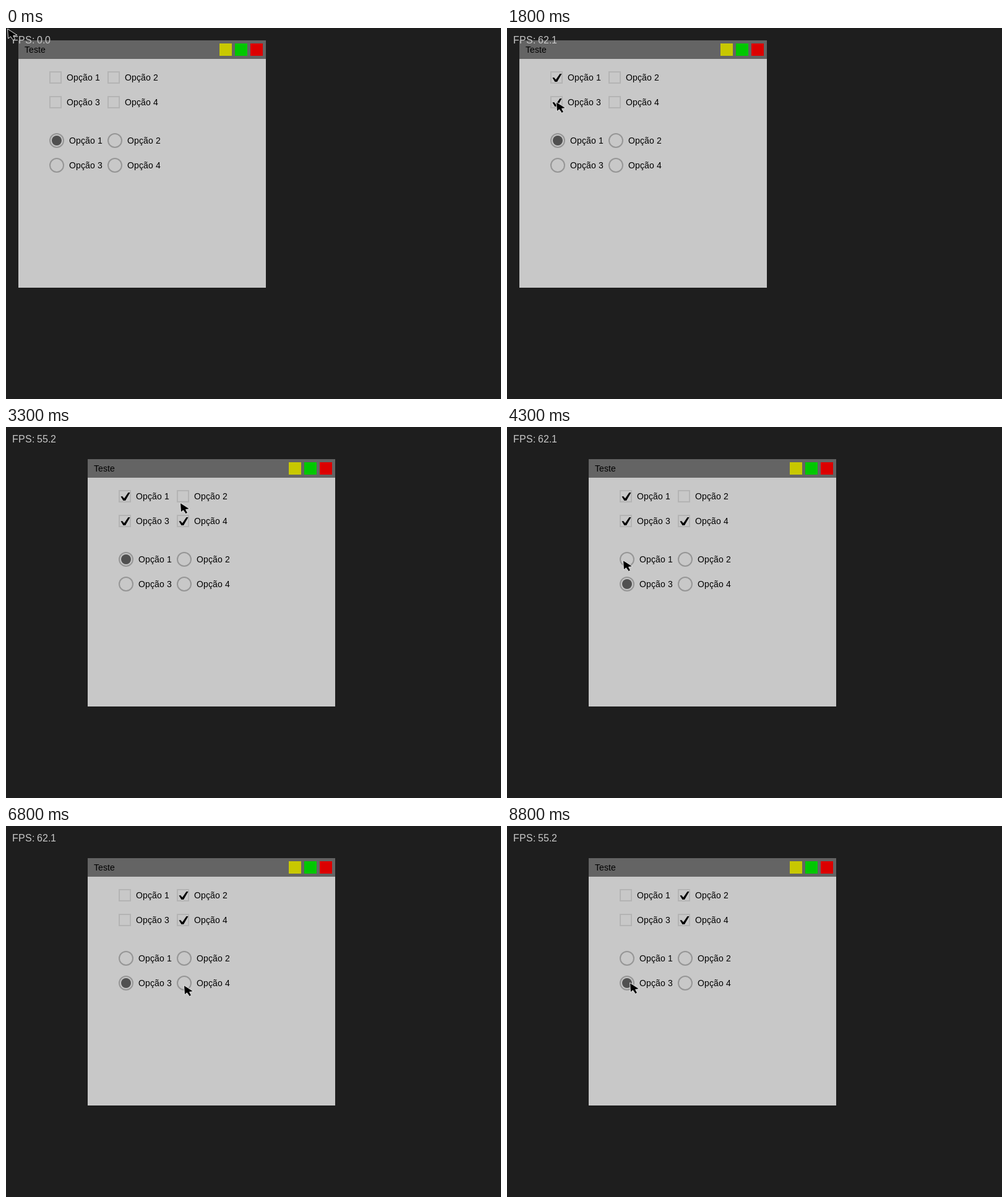
Recreate the animation shown at these times as an HTML page with a canvas. Size 800x600 px, loop 9 s.

```html
<!DOCTYPE html>
<html lang="pt">
<head>
<meta charset="utf-8">
<title>Teste</title>
<style>
html, body { margin: 0; width: 100%; height: 100%; overflow: hidden; background: #1e1e1e; }
canvas { display: block; }
</style>
</head>
<body>
<canvas id="stage" width="800" height="600"></canvas>
<script>
const ctx = document.getElementById('stage').getContext('2d');
const STEP = 100, LOOP = 9000;

// Widgets 0-3 are checkboxes, 4-7 radio buttons
const place = i => [50 + 94 * (i % 2), (i < 4 ? 50 : 110) + 40 * (i >> 1) - (i < 4 ? 0 : 40) + (i < 4 ? 0 : 0)];
const isRadio = i => i > 3;

// Clicks: step, widget and, where it differs, the pointer's offset in the widget
const clicks = [
  [8, 0], [17, 2], [20, 3], [39, 6], [44, 4, 5, 13], [47, 5], [52, 1], [55, 2], [60, 0],
  [63, 4], [66, 6], [69, 7], [78, 5], [83, 4], [87, 6, 16, 11]
];
// Dragging by the title bar: step, pointer x, y
const drag = [[24, 204, 36], [28, 290, 54], [29, 316, 68]];
const rates = [55.2, 59.9, 62.1, 60.2, 61.7, 62.5, 57.8, 62.1, 58.8, 62.5, 62.1];

function along(keys, step) {
  const next = keys.findIndex(k => k[0] >= step);
  if (next < 0) return keys[keys.length - 1].slice(1);
  const [t1, x1, y1] = keys[next], [t0, x0, y0] = keys[Math.max(0, next - 1)];
  const k = t1 > t0 ? (step - t0) / (t1 - t0) : 0;
  return [Math.round(x0 + (x1 - x0) * k), Math.round(y0 + (y1 - y0) * k)];
}

function origin(step) {
  const [x, y] = along(drag, step);
  return [20 + x - drag[0][1], 20 + y - drag[0][2]];
}

// The pointer rests on a widget one step before and after its click
function rest([step, i, dx = isRadio(i) ? 11 : 9, dy = isRadio(i) ? 15 : 9]) {
  const [ox, oy] = origin(step), [x, y] = place(i);
  return [-1, 1].map(d => [step + d, ox + x + dx, oy + y + dy]);
}
const path = [[0, 2, 1], [1, 192, 40], ...clicks.flatMap(rest), ...drag, [31, 316, 68]]
  .sort((a, b) => a[0] - b[0]);

function rect(color, x, y, w, h) {
  ctx.fillStyle = color;
  ctx.fillRect(x, y, w, h);
}

// Sets each glyph on a whole pixel, kerning included
function text(str, x, y, size = 14, color = '#000') {
  ctx.font = size + 'px "Liberation Sans", Arial, sans-serif';
  ctx.fillStyle = color;
  const width = s => ctx.measureText(s).width;
  [...str].forEach((c, i) => {
    const next = str[i + 1] || '';
    ctx.fillText(c, x, y);
    x += Math.round(width(c + next) - width(next));
  });
}

function polygon(color, points) {
  ctx.beginPath();
  points.forEach(([x, y]) => ctx.lineTo(x, y));
  ctx.closePath();
  ctx.fillStyle = color;
  ctx.fill();
}

function stroke(color, width) {
  ctx.strokeStyle = color;
  ctx.lineWidth = width;
  ctx.stroke();
}

function checkbox(label, on) {
  ctx.beginPath();
  ctx.rect(1, 1, 18, 18);
  stroke('#b4b4b4', 2);
  if (on) polygon('#000', [[3.5, 10.5], [6, 10], [9, 13.5], [15.5, 4], [18.5, 4], [11, 17], [7.5, 17]]);
  text(label, 28, 15);
}

function radio(label, on) {
  ctx.beginPath();
  ctx.arc(12, 12, 11, 0, 7);
  stroke('#969696', 2);
  if (on) {
    ctx.beginPath();
    ctx.arc(12, 12, 8, 0, 7);
    ctx.fillStyle = '#505050';
    ctx.fill();
  }
  text(label, 32, 17);
}

function at([x, y], paint) {
  ctx.save();
  ctx.translate(x, y);
  paint();
  ctx.restore();
}

function panel(step) {
  rect('#c8c8c8', 0, 0, 400, 400);
  rect('#646464', 0, 0, 400, 30);
  ['#c8c800', '#00c800', '#dc0000'].forEach((c, i) => rect(c, 325 + 25 * i, 5, 20, 20));
  text('Teste', 10, 20);
  const hits = clicks.filter(c => c[0] <= step).map(c => c[1]);
  const chosen = hits.filter(isRadio).pop() ?? 4;
  for (let i = 0; i < 8; i++) {
    const label = 'Opção ' + (i % 4 + 1);
    at(place(i), () => isRadio(i)
      ? radio(label, i === chosen)
      : checkbox(label, hits.filter(h => h === i).length % 2));
  }
}

function pointer() {
  polygon('#000', [[.5, .5], [1.5, 16], [5.5, 12.8], [9.5, 18.6], [12.5, 16.8], [9.6, 11.5], [16, 10.5]]);
  ctx.lineJoin = 'round';
  stroke('#e6e6e6', 1);
}

function draw(step) {
  if (step === 9 || step === 89) step--; // two longer pauses
  rect('#1e1e1e', 0, 0, 800, 600);
  at(origin(step), () => panel(step));
  const rate = step ? rates[step % rates.length] : 0;
  text('FPS: ' + rate.toFixed(1), 10, 25, 16, '#c8c8c8');
  at(along(path, step), pointer);
}

const start = performance.now();
function tick() {
  draw(Math.floor((performance.now() - start) % LOOP / STEP));
  requestAnimationFrame(tick);
}
tick();
</script>
</body>
</html>
```
